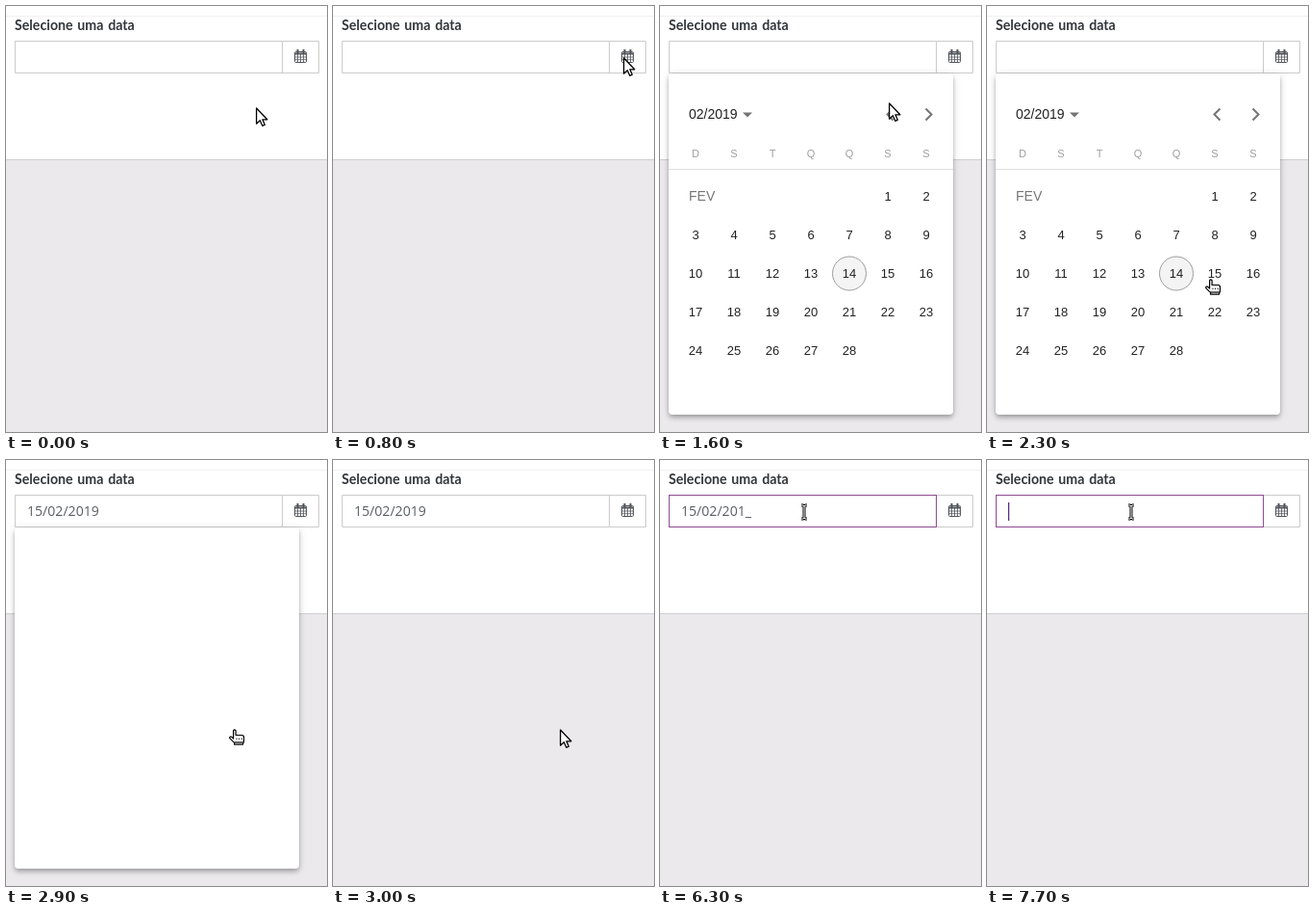
These frames come from a looping animation (334 px wide and 442 px high, 8000 ms). An HTML page:

```html
<!DOCTYPE html>
<html lang="pt">
<head>
<meta charset="utf-8">
<title>Selecione uma data</title>
<style>
  html, body { margin: 0; width: 100%; height: 100%; overflow: hidden; background: #ebe9ec; }
  svg { position: absolute; left: 0; top: 0; display: block; }
  .label { font: bold 14.2px Lato, "Open Sans", sans-serif; word-spacing: 1.3px; fill: #32363a; }
  #value { font: 14.1px "Open Sans", sans-serif; fill: #5a5d63; }
  #panel {
    position: absolute; left: 9px; top: 70px; width: 296px; height: 354px;
    background: #fff; border-radius: 4px; transform-origin: top;
    box-shadow: 0 2px 4px -1px rgba(0,0,0,.2), 0 4px 5px rgba(0,0,0,.14), 0 1px 10px rgba(0,0,0,.12);
  }
  #panel text { font: 13px "Liberation Sans", Arial, sans-serif; fill: rgba(0,0,0,.87); }
  #panel .mid { text-anchor: middle; }
  #panel .head { font-size: 14px; }
  #panel .week { font-size: 11px; fill: rgba(0,0,0,.38); }
  #panel .month { font-size: 14px; fill: rgba(0,0,0,.54); }
</style>
</head>
<body>
<svg width="334" height="442">
  <rect width="334" height="159" fill="#fff"/>
  <path d="M0 10.5H334" stroke="#f0f0f0"/>
  <path d="M0 159.5H334" stroke="#d0ced1"/>
  <text class="label" x="9" y="25">Selecione uma data</text>
  <path d="M9.5 36.5H325.5V69.5H9.5ZM287.5 36.5V69.5" fill="none" stroke="#ccc"/>
  <rect id="focus" x="9.5" y="36.5" width="278" height="33" fill="none" stroke="#8e4a92"/>
  <g fill="none" stroke="#50545a">
    <rect x="300.5" y="47.5" width="12" height="11" rx="1"/>
    <path d="M300 49.5H313" stroke-width="2"/>
    <path d="M303.5 45V49M309.5 45V49" stroke-width="2"/>
    <path d="M303.5 50V58M306.5 50V58M309.5 50V58M301 53H312M301 55.7H312" stroke-width=".8"/>
  </g>
  <text id="value" x="22" y="58"></text>
  <rect id="caret" y="44" width="1.2" height="19" fill="#5a2478"/>
</svg>

<div id="panel">
  <svg id="calendar" width="296" height="354" viewBox="9 70 296 354">
    <text class="head" x="30" y="117">02/2019</text>
    <path d="M86 110.5H96L91 115.5Z" fill="#757575"/>
    <path d="M242.5 106.5L236.5 112.5L242.5 118.5M276.5 106.5L282.5 112.5L276.5 118.5"
      fill="none" stroke="#757575" stroke-width="2"/>
    <path d="M9 169.5H305" stroke="#e0e0e0"/>
    <text class="month" x="30" y="202">FEV</text>
    <circle id="today" cx="197" cy="277.5" r="17.5" stroke="#9e9e9e"/>
  </svg>
</div>

<svg width="334" height="442">
  <g id="cursor" stroke-linejoin="round">
    <path id="arrow" d="M.6 1V17.2L4.3 13.8L6.8 19.3L9.3 18.2L6.9 12.8H11.8Z" fill="#fff" stroke="#000" stroke-width="1.3"/>
    <g id="hand" fill="#fff" stroke="#000" stroke-width="1.2">
      <path d="M.6 10V1.8Q1.8 -.2 3.1 1.8V6.5H9.5Q11.5 6.6 11.5 8.6V13L10.3 16.2H1.6V14.4L-3.3 9.6Q-3.3 7.7 -1.5 8.1Z"/>
      <path d="M3.5 10.3H9.8" stroke-dasharray="1 1.6"/>
      <path d="M1.6 14H10.8"/>
    </g>
    <g id="beam" fill="none">
      <path id="stem" d="M-3 -7H-1L0 -6L1 -7H3M0 -6V6M-3 7H-1L0 6L1 7H3" stroke="#000" stroke-width="3"/>
      <use href="#stem" id="core"/>
      <path d="M-3 -7H-1L0 -6L1 -7H3M0 -6V6M-3 7H-1L0 6L1 7H3" stroke="#fff"/>
    </g>
  </g>
</svg>

<script>
const LOOP = 8000, STEP = 100;
const $ = id => document.getElementById(id);
const show = (id, on) => { $(id).style.display = on ? "" : "none"; };

function addText(text, x, y, cls) {
  const el = document.createElementNS("http://www.w3.org/2000/svg", "text");
  el.setAttribute("x", x);
  el.setAttribute("y", y);
  el.setAttribute("class", cls);
  el.textContent = text;
  $("calendar").append(el);
}
[..."DSTQQSS"].forEach((d, i) => addText(d, 37 + 40 * i, 157, "mid week"));
for (let day = 1; day <= 28; day++) {
  const cell = day + 4;
  addText(day, 37 + 40 * (cell % 7), 202 + 40 * Math.floor(cell / 7), "mid");
}
$("core").remove();

// Pointer path: time, x, y
const path = [
  [300, 260, 105], [800, 302, 53],
  [1200, 302, 53], [1600, 238, 100], [2100, 213, 272], [2200, 222, 280], [2300, 231, 283], [2400, 236, 279],
  [3300, 236, 279], [3400, 215, 217],
  [3500, 215, 217], [3900, 155, 66],
  [4000, 155, 66], [4100, 152, 58], [4200, 150, 54]
];

// Masked input: time, text, caret index
const edits = [
  [0, "", 0], [2900, "15/02/2019", 10],
  [6000, "15/02/201_", 9], [6800, "15/02/20__", 8],
  [7000, "15/02/2___", 7], [7100, "15/02/____", 5],
  [7300, "15/0_/____", 4], [7400, "15/__/____", 2],
  [7600, "1_/__/____", 1], [7700, "", 0]
];

const within = (t, from, to) => t >= from && t < to;

function pointerAt(t) {
  const i = path.findIndex(p => p[0] > t);
  if (i === 0) return path[0].slice(1);
  if (i < 0) return path[path.length - 1].slice(1);
  const [t0, x0, y0] = path[i - 1], [t1, x1, y1] = path[i];
  const k = (t - t0) / (t1 - t0);
  return [Math.round(x0 + (x1 - x0) * k), Math.round(y0 + (y1 - y0) * k)];
}

function draw(t) {
  const [x, y] = pointerAt(t);
  const hand = within(t, 1800, 3000), beam = t >= 3900;
  $("cursor").setAttribute("transform", `translate(${x} ${y})`);
  show("hand", hand);
  show("beam", beam);
  show("arrow", !hand && !beam);

  const opening = t < 1300;
  show("panel", within(t, 1100, 3000));
  $("panel").style.transform = opening ? "scaleY(.955)" : "none";
  $("panel").style.opacity = opening ? .75 : 1;
  show("calendar", t < 2900);
  $("today").setAttribute("fill", t < 2700 ? "#f4f4f4" : "#fff");

  const [, text, index] = edits.filter(e => e[0] <= t).pop();
  const value = $("value");
  if (value.textContent !== text) value.textContent = text;
  const offset = index ? value.getSubStringLength(0, index) : 0;
  $("caret").setAttribute("x", Math.round(22 + offset));
  show("caret", within(t, 4400, 5000) || within(t, 5600, 6300) || t >= 6800);
  $("focus").style.opacity = Math.min(1, Math.max(0, (t - 4200) / 200));
}

let last = -1;
const start = performance.now();
function tick() {
  const t = Math.floor((performance.now() - start) % LOOP / STEP) * STEP;
  if (t !== last) draw(last = t);
  requestAnimationFrame(tick);
}
draw(0);
tick();
</script>
</body>
</html>
```
